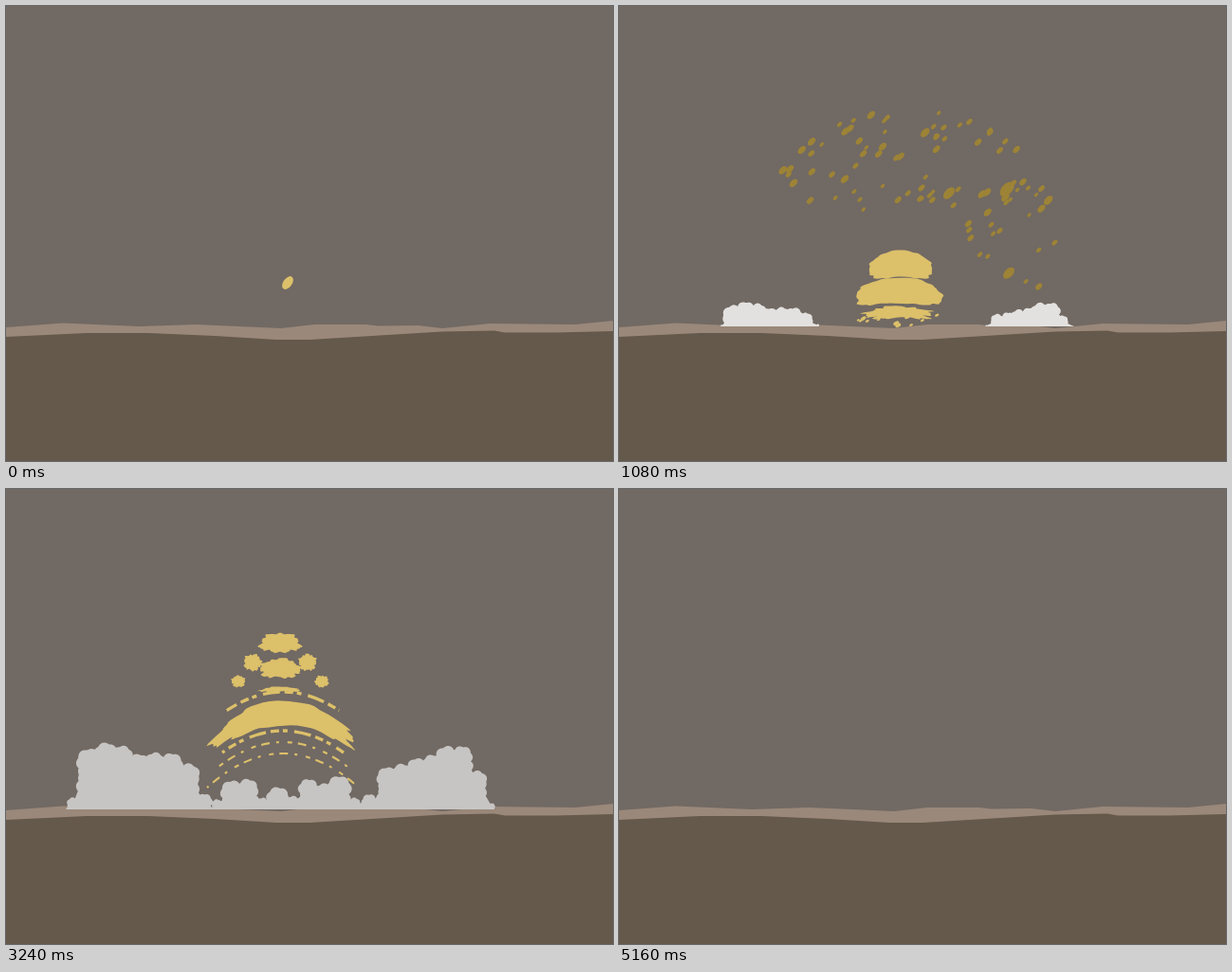
Write an HTML page with a canvas that moves like this. It is 640 px wide and 480 px high and loops after 5.64 s.

```html
<!DOCTYPE html>
<html lang="en">
<head>
<meta charset="utf-8">
<title>Explosion</title>
<style>
html, body { margin: 0; overflow: hidden; background: #716963; }
canvas { display: block; width: 640px; height: 480px; }
</style>
</head>
<body>
<canvas id="stage" width="640" height="480"></canvas>
<script>
const c = document.getElementById('stage').getContext('2d');
const STEP = 120, LAST = 43, LOOP = 5640, GROUND = 338, TAU = Math.PI * 2;
const YELLOW = '#dcc06a', OCHRE = '#9d8336', CREAM = '#f3e6bc';

const lerp = (a, b, k) => a + (b - a) * k;
const rnd = n => { const v = Math.sin(n * 127.1 + 11.7) * 43758.5453; return v - Math.floor(v); };
const progress = (t, from, to) => Math.min(1, Math.max(0, (t - from) / (to - from)));

// Interpolates rows of [time, ...values]; holds the first and last row.
function track(t, ...rows) {
  const i = rows.findIndex(r => r[0] > t);
  if (i === 0) return rows[0].slice(1);
  if (i < 0) return rows[rows.length - 1].slice(1);
  const a = rows[i - 1], b = rows[i], k = progress(t, a[0], b[0]);
  return a.slice(1).map((v, j) => lerp(v, b[j + 1], k));
}

function poly(points, color) {
  c.beginPath();
  points.forEach(p => c.lineTo(...p));
  c.closePath();
  c.fillStyle = color;
  c.fill();
}

// Rough rounded cushion whose ends droop by bend.
function cushion([x, y, rx, ry, bend = 0], color, seed, rough = .03, square = .72) {
  if (rx < .6 || ry < .6) return;
  const pow = v => Math.sign(v) * Math.abs(v) ** square;
  const points = [];
  for (let i = 0; i < 90; i++) {
    const a = i / 90 * TAU;
    const n = 1 + rough * (Math.sin(5 * a + seed) + Math.sin(11 * a + seed * 2) + .6 * Math.sin(19 * a + seed * 3));
    const u = pow(Math.cos(a)) * n;
    points.push([x + rx * u, y + ry * pow(Math.sin(a)) * n + bend * u * u]);
  }
  poly(points, color);
}

function flake(x, y, r, color, tilt = -.8) {
  if (r < .4) return;
  c.fillStyle = color;
  c.beginPath();
  c.ellipse(x, y, r * 1.25, r * .75, tilt, 0, TAU);
  c.fill();
}

function scatter(count, seed, x, y, rx, ry, size, color) {
  for (let i = seed; i < seed + count; i++) {
    const a = rnd(i) * TAU, d = Math.sqrt(rnd(i + .4));
    flake(x + rx * d * Math.cos(a), y + ry * d * Math.sin(a), size * lerp(.6, 1.3, rnd(i + .7)), color, -.5);
  }
}

function aboveGround(paint) {
  c.save();
  c.beginPath();
  c.rect(0, 0, 640, GROUND);
  c.clip();
  paint();
  c.restore();
}

const ridge = [[0, 339], [60, 334.5], [140, 338], [200, 336], [290, 340], [325, 336], [380, 336], [392, 337.5],
  [435, 337], [460, 340], [510, 335], [600, 336], [640, 332]];
const soil = [[0, 349], [85, 345], [150, 345], [220, 348], [285, 352], [320, 352], [460, 343.5], [515, 342.5],
  [526, 344.5], [580, 344.5], [640, 343]];
const corners = [[640, 480], [0, 480]];

function fireball(t) {
  if (t < 120 || t > 1200) return;
  if (t <= 600) {
    const [s] = track(t, [120, .22], [240, .56], [360, .84], [480, 1], [600, 1.04]);
    return cushion([305, 300 - 40 * s, 166 * s, 158 * s], OCHRE, 3, .008, 1);
  }
  // The ball breaks into shrinking flakes, most of them near its rim.
  const size = 1.8 + 22 * (1 - progress(t, 720, 1200)) ** 1.9;
  for (let i = 0; i < 150; i++) {
    const filler = i >= 92;
    const a = filler ? rnd(i) * TAU : lerp(3.4, 6.8, rnd(i));
    const d = filler ? Math.sqrt(rnd(i + .3)) : 1 - .8 * rnd(i + .3) ** 2;
    const big = i % 14 === 0 ? 1.8 : 1;
    const r = (filler ? size - 7 : size) * lerp(.6, 1.25, rnd(i + .6)) * (t > 840 ? big : 1);
    flake(305 + 155 * d * Math.cos(a), 238 + 128 * d * Math.sin(a), r, OCHRE);
  }
}

// Each bank has its first and last x when young and when grown, heights, and the skyline between.
const banks = [
  { from: 252, born: 360, young: [92, 205], grown: [66, 210], heights: [48, 75],
    skyline: [.22, .92, 1, .96, .85, .87, .86, .72, .28] },
  { from: 336, born: 360, young: [393, 495], grown: [385, 516], heights: [46, 71],
    skyline: [.22, .7, .75, .83, .88, 1, 1, .65, .13] },
  { from: 296, born: 1200, young: [247, 347], grown: [217, 391], heights: [17, 39],
    skyline: [.35, .88, .92, .4, .7, .45, .92, .8, 1, .4, .5] }
];

function puff(x, y, r, color, seed) {
  const points = [];
  for (let i = 0; i < 48; i++) {
    const a = i / 48 * TAU, q = r * (.9 + .14 * Math.abs(Math.sin(3 * a + seed)));
    points.push([x + q * Math.cos(a), y + q * Math.sin(a)]);
  }
  poly(points, color);
}

function smokeBank({ from, born, young, grown, heights, skyline }, t, color) {
  const age = 1 - (1 - progress(t, 1920, 4200)) ** 2;
  const spread = born > 1000 ? 1 : .9 * (1 - (1 - progress(t, 360, 1080)) ** 3) + .1 * progress(t, 1080, 1920);
  const height = lerp(...heights, age) * progress(t, born, 1920) ** .8;
  if (!height) return;
  const left = lerp(young[0], grown[0], age), right = lerp(young[1], grown[1], age);
  const body = [];
  skyline.forEach((v, i) => {
    const x = lerp(from, lerp(left, right, i / (skyline.length - 1)), spread);
    const h = height * v ** lerp(1.8, 1, age);
    const r = Math.min(lerp(9, 11, age) + 3 * rnd(i + from), h * .52);
    for (let y = GROUND - h + r, j = 0; y < GROUND + r; y += Math.max(2, r), j++) {
      puff(x + (j ? 3 * (rnd(i + j * 9) - .5) : 0), y, r, color, i * 1.7 + j + t / 900);
    }
    body.push([x, GROUND - h + r]);
  });
  poly([...body, [body[body.length - 1][0], GROUND], [body[0][0], GROUND]], color);
}

function smoke(t) {
  if (t < 480 || t >= 4800) return;
  const [gray] = track(t, [2400, 225], [3240, 197], [4200, 152], [4800, 108]);
  const color = `rgb(${gray + 2}, ${gray}, ${gray - 2})`;
  aboveGround(() => banks.forEach(bank => smokeBank(bank, t, color)));
}

// Three rising tiers, the lower two with a scrap on either side.
function tornPlume(t) {
  const [k] = track(t, [3240, 0], [4200, 1], [4800, 2], [5160, 2.4]);
  const early = 1 - progress(t, 2640, 3240);
  const fade = Math.min(1, (2.4 - k) / 1.4), part = Math.min(1, k);
  for (let tier = 0; tier < 3; tier++) {
    const lift = 48 * k / (1 + .85 * tier) - 27 * early;
    for (const side of [0, -1, 1]) {
      if (side && !tier) continue;
      const x = 289 + side * (14 + 15 * tier) * (1 - .15 * k);
      const y = (side ? 163 + 20 * tier : 162 + 27 * tier - 5 * (tier >> 1)) - lift;
      const swell = (1 + .5 * early) * fade * (1 - (side ? .78 : .38) * part);
      const w = (side ? 11 - 2 * tier : 21) * swell;
      const h = (side ? 11 - 2.5 * tier : tier < 2 ? 10 + 5 * part * tier : 2.5) * swell;
      if (side || k < .5) cushion([x, y, w, h, side ? 0 : 2], YELLOW, tier * 2.3 + side + k, .07, .9);
      else scatter(tier < 2 ? 26 : 9, tier * 40, x, y, w, h * 1.4, 3 * fade, YELLOW);
    }
  }
  if (t > 3720) scatter(13, 200, 290, 235 + (4200 - t) / 40, 55, 90, 1.8 * (1 - progress(t, 4200, 4680)), YELLOW);
}

function streaks(t) {
  const [width, y, reach, bend] = track(t, [2640, 0, 252, 60, 22], [3240, 3, 235, 80, 36], [3960, 0, 220, 78, 45]);
  if (width <= 0) return;
  c.strokeStyle = YELLOW;
  for (let i = 0; i < 4; i++) {
    const dy = i ? 8 + 12 * i : -21, span = i ? .7 + .1 * i : .74;
    const w = reach * span, b = bend * span * span;
    c.lineWidth = width * (i < 2 ? 1.1 : .7);
    c.setLineDash(i < 2 ? [18, 5, 9, 4, 5, 7] : [5, 6, 9, 7, 3, 9]);
    c.lineDashOffset = t / 60 + i * 9;
    c.beginPath();
    c.moveTo(292 - w, y + dy + b);
    c.quadraticCurveTo(292, y + dy - b, 292 + w, y + dy + b);
    c.stroke();
  }
  c.setLineDash([]);
}

function plume(t) {
  if (t >= 5160) return;
  if (t === 0) return flake(297, 292, 6.2, YELLOW, -.95);
  const foot = track(t, [600, 295, 326, 0, 0, 0], [1080, 295, 323, 34, 6, 3], [1560, 294, 312, 20, 0, 0]);
  const lower = track(t, [240, 300, 317, 0, 0, 0], [480, 299, 317, 8, 2, 0], [1080, 295, 300, 45, 13.5, 8],
    [1920, 293, 280, 51, 20, 9], [3240, 293, 236, 74, 13, 32], [3960, 292, 220, 74, 0, 42]);
  const upper = track(t, [120, 297, 290, 10, 8, 2], [480, 297, 283, 29, 14, 6], [1080, 297, 272, 33, 14, 7],
    [1920, 293, 230, 44, 18.5, 10], [3240, 291, 175, 46, 22, 18]);
  cushion(foot, YELLOW, 4, .1);
  cushion(lower, YELLOW, t / 700, t > 2800 ? .05 : .025);
  if (t < 2640) cushion(upper, YELLOW, t / 800 + 2, .025, t < 600 ? 1 : .72);
  else tornPlume(t);
  streaks(t);
  const glow = 1 - progress(t, 480, 840);
  if (glow) cushion([299, 279 + 8 * glow, 15 * glow, 7 * glow, 2], CREAM, 2, .08, 1);
  if (t >= 840 && t <= 1320) scatter(16, 70, 297, 330, 52, 7, 2, YELLOW);
}

function draw(now) {
  const t = Math.min(LAST, Math.floor(now % LOOP / STEP)) * STEP;
  c.fillStyle = '#716963';
  c.fillRect(0, 0, 640, 480);
  aboveGround(() => fireball(t));
  poly([...ridge, ...corners], '#9a887a');
  poly([...soil, ...corners], '#65594c');
  smoke(t);
  plume(t);
}

const start = performance.now();
(function tick() {
  draw(performance.now() - start);
  requestAnimationFrame(tick);
})();
</script>
</body>
</html>
```
